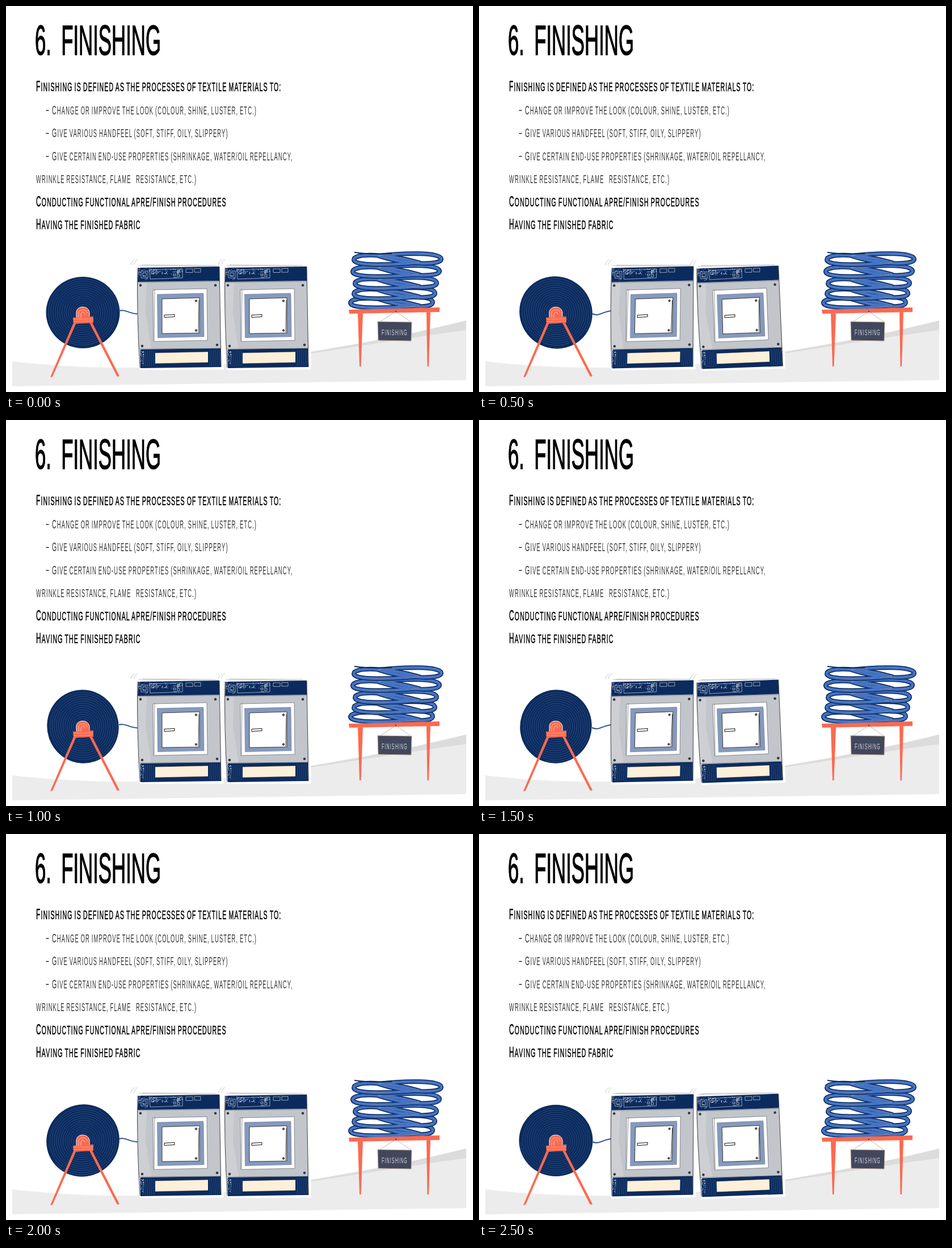
Recreate the animation shown at these times as an HTML page. Size 823x680 px, loop 3000 ms.

```html
<!DOCTYPE html>
<html lang="en">
<head>
<meta charset="utf-8">
<title>Finishing</title>
<style>
  html, body { margin: 0; width: 100%; height: 100%; overflow: hidden; background: #fff; }
  svg { display: block; width: 823px; height: 680px; }
  text { font-family: "Liberation Sans", Arial, sans-serif; letter-spacing: 2.4px; word-spacing: -2px; white-space: pre; fill: #000; }
  .title { font-size: 74px; letter-spacing: 0; word-spacing: 16px; stroke: #000; stroke-width: 1.5px; }
  .head { font-size: 22.5px; stroke: #000; stroke-width: .6px; }
  .item { font-size: 20px; fill: #333; }
  .sign { font-size: 15px; fill: #d5d8e0; }
  .cap { font-size: 1.14em; }
</style>
</head>
<body>
<svg id="stage" viewBox="0 0 823 680" xmlns="http://www.w3.org/2000/svg">
  <g id="ground">
    <path fill="#dcdcdc" d="M380 634C520 612 660 592 811 554V640H380Z"/>
    <path fill="#ececec" d="M11 626C130 640 250 640 380 631C520 619 650 592 811 571V659L11 670Z"/>
  </g>
  <g id="roll"></g>
  <path id="thread" fill="none" stroke="#2f5490" stroke-width="2"/>
  <g id="stand" fill="#fb6a50">
    <path d="M119 558H124L82 653L78 654Z M147 558H152L200 652L196 653Z"/>
    <path d="M124 551V540C124 527 146 527 147 540V551Z" stroke="#fff"/>
    <path d="M118 549L154 547V558L119 560Z"/>
    <path d="M128 549V541C129 533 142 533 143 541M132 549V543C133 538 138 538 139 543" fill="none" stroke="#ffd9cf" stroke-width=".8"/>
    <path d="M119 552L153 551M119 556L153 555" stroke="#ffb5a3" stroke-width=".7"/>
  </g>
  <g id="machines"></g>
  <g id="pile"></g>
  <g id="table">
    <path fill="#fb6a50" d="M604 535L764 531V539L605 542Z M620 541H629L625.500 635H623Z M741 539H748L745 635H742.500Z"/>
    <path fill="none" stroke="#a79e96" stroke-width=".7" d="M658 557L687 538L714 557"/>
    <circle cx="687" cy="538" r="1.2" fill="#444"/>
    <path fill="#41475c" stroke="#b9a08d" d="M655 556L715 557L714 590L656 589Z"/>
  </g>
  <g id="words"></g>
</svg>
<script>
const NS = "http://www.w3.org/2000/svg";
const NAVY = "#0b2b5e";
const STEP = 500, STEPS = 6;
const $ = id => document.getElementById(id);

function add(parent, tag, attrs = {}) {
  const el = document.createElementNS(NS, tag);
  for (const key in attrs) el.setAttribute(key, attrs[key]);
  parent.appendChild(el);
  return el;
}

function random(seed) {
  return () => (seed = (seed * 16807) % 2147483647) / 2147483647;
}

// Tall, narrow lettering: all capitals, true capitals slightly larger.
const CONDENSED = 0.47;
function write(style, x, y, line) {
  const el = add($("words"), "text", { class: style, transform: `translate(${x} ${y}) scale(${CONDENSED} 1)` });
  for (const part of line.split(/([A-Z])/).filter(Boolean)) {
    const big = /[A-Z]/.test(part) && style !== "title";
    const span = add(el, "tspan", big ? { class: "cap" } : {});
    span.textContent = part.toUpperCase();
  }
}

function writeAll() {
  write("title", 51, 86, "6. FINISHING");
  write("head", 53, 150, "Finishing is defined as the processes of textile materials to:");
  const items = [
    "Change or improve the look (colour, shine, luster, etc.)",
    "Give various handfeel (soft, stiff, oily, slippery)",
    "Give certain end-use properties (shrinkage, water/oil repellancy,"
  ];
  items.forEach((item, i) => {
    const y = 190.5 + i * 40.5;
    add($("words"), "path", { d: `M70.5 ${y - 6.5}h5`, stroke: "#111", "stroke-width": 1.4 });
    write("item", 81, y, item);
  });
  write("item", 53, 312, "wrinkle resistance, flame   resistance, etc.)");
  write("head", 53, 352.5, "Conducting functional apre/finish procedures");
  write("head", 53, 393, "Having the finished fabric");
  write("sign", 662, 580, "finishing");
}

// Fabric roll: slightly oval disc with a spiral, centred on 0,0.
function drawRoll() {
  const g = $("roll");
  add(g, "ellipse", { rx: 65, ry: 63, fill: NAVY });
  let d = "";
  for (let a = 0; a <= 15 * 2 * Math.PI; a += 0.15) {
    const r = 4 + 0.62 * a;
    d += `${d ? "L" : "M"}${(r * Math.cos(a)).toFixed(1)} ${(r * 0.965 * Math.sin(a)).toFixed(1)}`;
  }
  add(g, "path", { d, fill: "none", stroke: "#3a5a8d", "stroke-width": 0.6 });
}

function speckle(g, seed, count, x, y, w, h) {
  const rnd = random(seed);
  let d = "";
  for (let i = 0; i < count; i++) {
    const px = x + w * rnd() ** 1.5, py = y + h * rnd();
    d += `M${px.toFixed(1)} ${py.toFixed(1)}l${(rnd() * 1.5).toFixed(1)} ${(rnd() - 0.5).toFixed(1)}`;
  }
  add(g, "path", { d, stroke: "#fff", "stroke-width": 0.7, "stroke-linecap": "round" });
}

function drawMachine(dx) {
  const g = add($("machines"), "g");
  const inner = add(g, "g", { transform: `translate(${dx} 0)` });
  const fill = (d, color) => add(inner, "path", { d, fill: color });
  const line = (d, color = "#20242c", width = 0.8) =>
    add(inner, "path", { d, fill: "none", stroke: color, "stroke-width": width });

  line("M236 638L380 637V600", "#fff", 7);
  line("M220 456Q222 449 227 446M225 456Q227 450 232 446", "#bbb", 0.8);
  line("M234 457L376 459M240 456L370 457", "#aaa", 0.7);

  fill("M231 486L376 484L379 604L234 605Z", "#c2c5ca");
  fill("M233 488L248 487L246 540L256 604L235 604Z", "#cdcfd3");

  fill("M233 461L376 459V484L232 486Z", NAVY);
  line("M238 467h12v12h-12z M253 465L311 463V479L254 481Z M317 463h12v6.500h-12z M332 462.500h11v6.500h-11z", "#cdd6e4", 0.7);
  line("M241 470h6v6h-6z M256 468h5v4h-5z M264 468h4v3h-4z M295 472h4v3h-4z M302 466h4v4h-4z M302 473h4v4h-4z M295 478h6", "#d5deeb", 0.7);
  speckle(inner, 71, 60, 252, 463, 58, 10);
  speckle(inner, 19, 20, 234, 461, 14, 22);

  fill("M236 605L378 603L379 636L237 638Z", NAVY);
  for (let i = 0; i < 6; i++) {
    line(`M${242 + i * 3.6} 607Q${244 + i * 3.6} 621 ${242 + i * 3.6} 635`, "#476490", 0.5);
    line(`M${359 + i * 3.4} 606Q${361 + i * 3.4} 620 ${359 + i * 3.4} 634`, "#476490", 0.5);
  }
  speckle(inner, 43, 35, 235, 604, 8, 33);
  fill("M263 611L356 609V628L263 630Z", "#fdf0da");
  line("M263 611L356 609M263 630L356 628", "#222", 0.5);

  line("M232 461Q230 540 236 637M376 460L379 636", "#30343c", 0.9);
  line("M232 487L376 485M234 604L378 603", "#6a707a", 0.6);

  fill("M259 500L354 498L355 589L260 591Z", "#fff");
  line("M259 500L354 498L355 589L260 591ZM262 499L261 590", "#4a4f59", 0.6);
  fill("M266 508L348 506L349 583L267 585Z", "#8699bd");
  line("M266 508L348 506M348 508L349 583", "#5b6478", 0.5);
  fill("M275 516L341 514V576L275 577Z", "#fff");
  line("M275 516L341 514V576L275 577ZM340 518L339 575", "#16181d", 0.8);
  line("M279 544.500L297 543.500V547.500L279 548.500Z", "#111", 1);
  for (const y of [519.5, 571.5])
    add(inner, "circle", { cx: 335, cy: y, r: 1.7, fill: "#667", stroke: "#111", "stroke-width": 0.8 });
  for (const [x, y] of [[237, 492], [369, 492], [240, 599], [372, 597]])
    add(inner, "circle", { cx: x, cy: y, r: 1.8, fill: "#3a3e47", stroke: "#15171b", "stroke-width": 0.8 });
  return g;
}

// Folded cloth: each layer is two long loops crossing near the middle.
function drawPile() {
  const g = $("pile");
  const layers = [[613, 767, 446], [611, 764, 467], [615, 759, 488], [613, 756, 506], [607, 752, 522]];
  const strokes = [[NAVY, 8], ["#4273c8", 4.8], ["#16397a", 1.1], ["#b4cdf6", 0.5]];
  for (const [l, r, y] of layers.reverse()) {
    const d = `M${l} ${y + 1}C${l} ${y - 11} 670 ${y - 10} 728 ${y + 6}C680 ${y + 10} ${l} ${y + 13} ${l} ${y + 1}Z`
      + `M${r} ${y}C${r} ${y - 13} 700 ${y - 11} 656 ${y - 6}C700 ${y + 9} ${r} ${y + 12} ${r} ${y}Z`;
    add(g, "path", { d, fill: "#fff" });
    for (const [stroke, width] of strokes)
      add(g, "path", { d, fill: "none", stroke, "stroke-width": width, "stroke-linejoin": "round" });
  }
  add(g, "path", { d: "M614 434Q640 438 680 436", fill: "none", stroke: NAVY, "stroke-width": 2 });
}

const about = (x, y, move) => `translate(${x} ${y}) ${move} translate(${-x} ${-y})`;

writeAll();
drawRoll();
drawPile();
const left = drawMachine(0), right = drawMachine(154);

function pose(step) {
  const shaken = step % 2 === 1;
  $("roll").setAttribute("transform", `translate(135.5 540) rotate(${step * 36})`);
  $("thread").setAttribute("d", shaken
    ? "M199 542C212 548 218 538 233 537"
    : "M199 537C212 534 216 542 232 542.500");
  left.setAttribute("transform", shaken ? about(306, 547, "skewX(-1.3) skewY(-.4)") : "");
  right.setAttribute("transform", shaken ? about(460, 547, "rotate(-1.2) skewX(.3)") : "");
}

function tick() {
  pose(Math.floor(performance.now() / STEP) % STEPS);
  requestAnimationFrame(tick);
}
tick();
</script>
</body>
</html>
```
